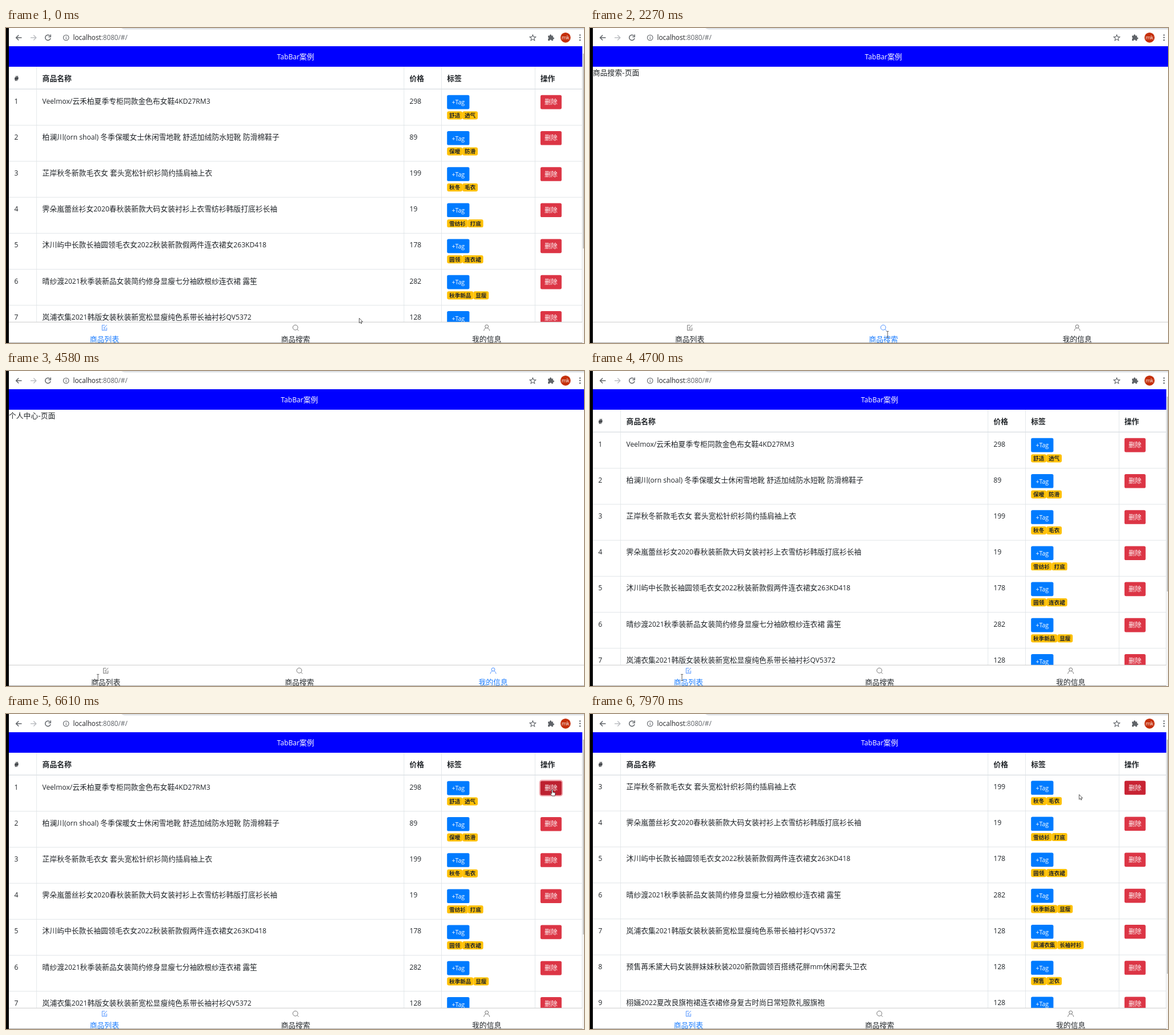
An HTML page for the animation above (8 s loop, 1012 px wide and 553 px high).

```html
<!DOCTYPE html>
<html lang="zh-CN">
<head>
<meta charset="utf-8">
<title>TabBar</title>
<style>
html, body { margin: 0; width: 100%; height: 100%; overflow: hidden; background: #fff; }
svg { display: block; width: 1012px; height: 553px; }
text { font-family: "Noto Sans CJK SC", "Noto Sans CJK JP", "Open Sans", sans-serif; fill: #212529; }
tspan { font-family: "Open Sans", "Noto Sans", sans-serif; font-size: .945em; }
.mid { text-anchor: middle; }
.bold { font-weight: 700; }
.white { fill: #fff; }
.line { stroke: #dee2e6; fill: none; }
.icon { fill: none; stroke: #5f6368; stroke-width: 1.5; }
.tab path { fill: none; stroke: #555; stroke-width: .8; }
.tab.on path { stroke: #2478ff; }
.tab.on text { fill: #1a7cff; }
.cursor { fill: #fff; stroke: #333; stroke-width: .8; }
</style>
</head>
<body>
<svg id="stage" viewBox="0 0 1012 553" xmlns="http://www.w3.org/2000/svg"></svg>
<script>
const LOOP = 8000, TOP = 107.6, ROW = 63.2;

const items = [
  ['Veelmox/云禾柏夏季专柜同款金色布女鞋4KD27RM3', 298, '舒适', '透气'],
  ['柏澜川(orn shoal) 冬季保暖女士休闲雪地靴 舒适加绒防水短靴 防滑棉鞋子', 89, '保暖', '防滑'],
  ['芷岸秋冬新款毛衣女 套头宽松针织衫简约插肩袖上衣', 199, '秋冬', '毛衣'],
  ['霁朵嵐蕾丝衫女2020春秋装新款大码女装衬衫上衣雪纺衫韩版打底衫长袖', 19, '雪纺衫', '打底'],
  ['沐川屿中长款长袖圆领毛衣女2022秋装新款假两件连衣裙女263KD418', 178, '圆领', '连衣裙'],
  ['晴纱渡2021秋季装新品女装简约修身显瘦七分袖欧根纱连衣裙 露笙', 282, '秋季新品', '显瘦'],
  ['岚浦衣集2021韩版女装秋装新宽松显瘦纯色系带长袖衬衫QV5372', 128, '岚浦衣集', '长袖衬衫'],
  ['预售苒禾黛大码女装胖妹妹秋装2020新款圆领百搭绣花胖mm休闲套头卫衣', 128, '预售', '卫衣'],
  ['栩婳2022夏改良旗袍裙连衣裙修身复古时尚日常短款礼服旗袍', 128, '旗袍', '礼服']
];

const text = (x, y, s, cls = '', size = 12.8, extra = '') =>
  `<text x="${x}" y="${y}" class="${cls}" font-size="${size}" ${extra}>` +
  String(s).replace(/[ -~]+/g, '<tspan>$&</tspan>') + '</text>';
const rect = (x, y, w, h, fill, extra = '') =>
  `<rect x="${x}" y="${y}" width="${w}" height="${h}" fill="${fill}" ${extra}/>`;
const path = (d, cls = '', extra = '') => `<path d="${d}" class="${cls}" ${extra}/>`;

// Browser toolbar
const toolbar = rect(0, 0, 1012, 32, '#fff') +
  path('M202 0q2 2.4 6 2.4H1012V0Z', '', 'fill="#dee1e6"') +
  path('M27.5 17H18M22.2 12.5L17.7 17L22.2 21.5', 'icon') +
  path('M43 17H52.5M48.3 12.5L52.8 17L48.3 21.5', 'icon', 'style="stroke:#bcbec2"') +
  path('M76.8 13.6A4.7 4.7 0 1 0 78 18M78.2 11.6V15.4H74.4', 'icon') +
  path('M110 17A4.8 4.8 0 1 1 100.4 17A4.8 4.8 0 1 1 110 17M105.2 16.3V19.8M105.2 14V15.3', 'icon', 'style="stroke-width:1.1"') +
  `<text x="117.6" y="21" font-size="12.4"><tspan fill="#202124">localhost</tspan><tspan fill="#5f6368">:8080/#/</tspan></text>` +
  path('M922.3 11.9L923.8 15.4L927.6 15.7L924.7 18.2L925.6 21.9L922.3 19.9L919 21.9L919.9 18.2L917 15.7L920.8 15.4Z', 'icon', 'style="stroke-width:1.1"') +
  path('M949 13.6H951.9V12.8A1.5 1.5 0 0 1 954.9 12.8V13.6H957.8V16.4H958.4A1.5 1.5 0 0 1 958.4 19.4H957.8V22.2H955.2A1.7 1.7 0 0 0 951.8 22.2H949V19.3A1.7 1.7 0 0 0 949 16.2Z', '', 'fill="#5f6368"') +
  '<circle cx="979.7" cy="16.8" r="8.9" fill="#c5300c"/>' +
  text(979.7, 20, 'mk', 'mid white', 10) +
  [12.4, 16.8, 21.2].map(y => `<circle cx="1005" cy="${y}" r="1.2" fill="#5f6368"/>`).join('');

// One table row, drawn from its top edge
const badge = (x, s) => {
  const w = s.length * 9.6 + 7.7;
  return rect(x, 38.7, w, 14.2, '#ffc107', 'rx="3.2"') +
    text(x + w / 2, 49.4, s, 'mid bold', 9.6);
};
const row = ([name, price, a, b], i) => `<g class="row">` +
  text(9.8, 25.1, i + 1).replace('x="9.8"', 'x="14.6"') +
  text(63.6, 25.1, name) + text(706.5, 25.1, price) +
  rect(772.2, 10.2, 39.2, 24.6, '#007bff', 'rx="2.6"') +
  text(791.8, 26.8, '+Tag', 'mid white', 11.2) +
  badge(772.2, a) + badge(772.2 + a.length * 9.6 + 7.7, b) +
  rect(935.8, 10.2, 37, 24.6, '#dc3545', 'rx="2.6" class="del" stroke="#e15361" stroke-opacity=".5" stroke-width="0" paint-order="stroke"') +
  text(954.3, 26.7, '删除', 'mid white', 11.2) +
  path(`M5 ${ROW}H1009`, 'line', 'stroke-width=".9"') + '</g>';

const heads = [[14.6, '#'], [63.6, '商品名称'], [706.5, '价格'], [772.2, '标签'], [935.8, '操作']];
const list = '<g id="list">' +
  heads.map(([x, s]) => text(x, 93.3, s, 'bold')).join('') +
  path('M5 107.3H1009', 'line', 'stroke-width="1.6"') +
  items.map(row).join('') +
  path('M53.6 68V516M696.8 68V516M762.5 68V516M926.3 68V516M1008.6 68V516', 'line', 'stroke-width=".8"') +
  '</g>';

// Bottom tabs, each drawn around its own centre line
const tabs = [
  ['商品列表', 'M.8 521.8H-4V530.8H4V526M-1.8 525.4H0M-1.8 528.4H2M4.2 521.2L.6 525.6L.2 527'],
  ['商品搜索', 'M4 525.8A4.4 4.4 0 1 1 -4.8 525.8A4.4 4.4 0 1 1 4 525.8M2.8 529L5.4 531.6'],
  ['我的信息', 'M2.9 524A2.9 2.9 0 1 1 -2.9 524A2.9 2.9 0 1 1 2.9 524M-5 531.6C-4.6 528.6 -3 527.2 -1.2 526.7M5 531.6C4.6 528.6 3 527.2 1.2 526.7']
];
const bar = rect(5, 516, 1007, 37, '#fff') + rect(5, 515.8, 1007, 1, '#cdcdcd') +
  tabs.map(([s, d]) => `<g class="tab">${path(d)}${text(0, 551.2, s, 'mid')}</g>`).join('') +
  rect(5, 552, 1007, 1, '#aaa');

const cursors = {
  arrow: 'M.4 .4V9L2.4 7.2L3.7 10L5 9.4L3.8 6.7H6.5Z',
  beam: 'M-2 -5.5H-.6L0 -5L.6 -5.5H2M0 -5V5M-2 5.5H-.6L0 5L.6 5.5H2',
  hand: 'M-1.4 6.8V1A.9 .9 0 0 1 .5 1V4.4L4.2 5.2Q5 5.5 4.8 7L4 10.8H-.8L-3.6 7.2Q-3.2 5.6 -1.4 6.8Z'
};

document.getElementById('stage').innerHTML =
  rect(0, 0, 1012, 553, '#fff') + list +
  text(5, 83.2, '', '', 12.8, 'id="note"') +
  '<rect id="header" x="5" y="32" height="36" fill="#00f"/>' +
  text(0, 55, 'TabBar案例', 'mid white', 12.8, 'id="title"') +
  bar +
  '<g id="scroll">' + rect(1009, 32, 3, 521, '#f4f4f4') + rect(1010, 45, 2, 342, '#c1c1c1', 'id="thumb"') + '</g>' +
  toolbar + rect(0, 0, 5, 553, '#000') +
  '<path id="cursor" class="cursor"/>';

const $ = id => document.getElementById(id);
const rows = [...document.querySelectorAll('.row')];
const tabEls = [...document.querySelectorAll('.tab')];

// Pointer moves: first step, last step, number of steps, target
const moves = [
  [280, 1110, 7, 178, 538],
  [1390, 1900, 5, 521, 538],
  [2280, 3300, 9, 853, 536],
  [3740, 4570, 7, 161, 538],
  [4970, 5250, 3, 752, 178],
  [5520, 6240, 6, 957, 133],
  [7850, 7970, 2, 856, 141]
];
const pages = [[0, 0], [2150, 1], [3430, 2], [4700, 0]];
const notes = ['', '商品搜索-页面', '个人中心-页面'];
const ease = u => u * u * (3 - 2 * u);

function pointer(t) {
  let x = 618, y = 509;
  for (const [from, to, n, tx, ty] of moves) {
    if (t < from) break;
    const step = Math.min(n, 1 + Math.floor((t - from) / (to - from) * (n - 1) + 1e-6));
    const u = ease(step / n);
    x += (tx - x) * u;
    y += (ty - y) * u;
  }
  return [x, y];
}

function draw(t) {
  const page = pages.filter(p => t >= p[0]).pop()[1];
  const width = page ? 1017.6 : 1004;
  const removed = t >= 7570 ? 2 : t >= 6730 ? 1 : 0;
  const focus = (t >= 6610 && t < 6730) || (t >= 7450 && t < 7570);

  $('list').style.display = $('scroll').style.display = page ? 'none' : '';
  $('note').textContent = notes[page];
  $('header').setAttribute('width', width);
  $('title').setAttribute('x', 5 + width / 2);
  $('thumb').setAttribute('height', [342, 373, 411][removed]);

  rows.forEach((el, i) => {
    const k = i - removed, first = k === 0;
    el.style.display = k < 0 ? 'none' : '';
    el.setAttribute('transform', `translate(0 ${TOP + k * ROW - (removed ? .6 : 0)})`);
    const del = el.querySelector('.del');
    del.setAttribute('fill', first && focus ? '#bd2130' : first && t >= 6240 ? '#c82333' : '#dc3545');
    del.setAttribute('stroke-width', first && focus ? 4.4 : 0);
  });

  const centres = tabEls.map((el, i) => {
    const c = 5 + width * (i + .5) / 3;
    el.setAttribute('transform', `translate(${c} 0)`);
    el.classList.toggle('on', i === page);
    return c;
  });

  const [x, y] = pointer(t);
  const onText = y > 536.5 && centres.some(c => Math.abs(x - c) < 26);
  const onButton = !page && x > 936 && x < 973 && y > 118 && y < 142;
  const cursor = $('cursor');
  cursor.setAttribute('d', cursors[onButton ? 'hand' : onText ? 'beam' : 'arrow']);
  cursor.setAttribute('transform', `translate(${x} ${y})`);
}

const start = performance.now();
(function tick() {
  draw((performance.now() - start) % LOOP);
  requestAnimationFrame(tick);
})();
</script>
</body>
</html>
```
